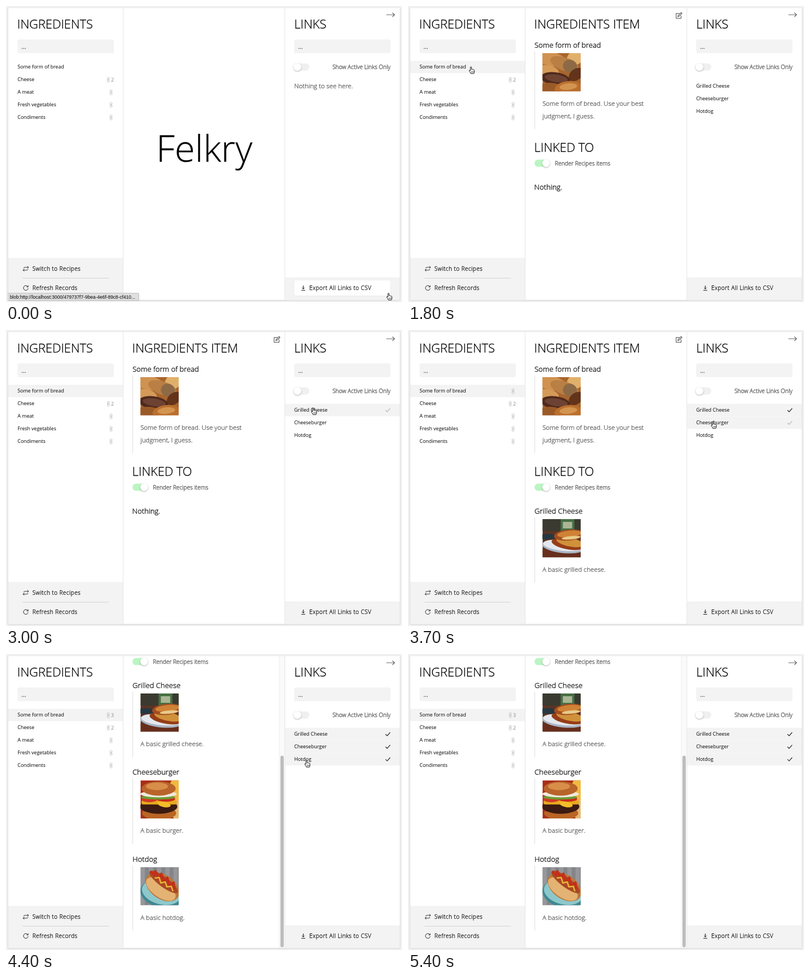
Write an HTML page with a canvas that moves like this. It is 720 px wide and 540 px high and loops after 5500 ms.

```html
<!DOCTYPE html>
<html lang="en">
<head>
<meta charset="utf-8">
<title>Linking records</title>
<style>
html, body { margin: 0; width: 100%; height: 100%; overflow: hidden; background: #f1f1f1; }
canvas { display: block; width: 720px; height: 540px; }
</style>
</head>
<body>
<canvas id="stage"></canvas>
<script>
const LOOP = 5500, STEP = 100;
const OPEN_AT = 1800, LINK_AT = [3300, 3900, 4200];
const PITCH = 158.4, PANEL = '#f3f3f3', LINE = '#e3e3e3';
const BODY = 11.7, LABEL = 10.4, TITLE = 13.4, HEADING = 22.4;

const canvas = document.getElementById('stage');
const ctx = canvas.getContext('2d');
const dpr = window.devicePixelRatio || 1;
canvas.width = 720 * dpr;
canvas.height = 540 * dpr;

const ingredients = ['Some form of bread', 'Cheese', 'A meat', 'Fresh vegetables', 'Condiments'];
const recipes = [
  { name: 'Grilled Cheese', note: 'A basic grilled cheese.', photo: sandwichPhoto },
  { name: 'Cheeseburger', note: 'A basic burger.', photo: burgerPhoto },
  { name: 'Hotdog', note: 'A basic hotdog.', photo: hotdogPhoto }
];

// time, x, y
const path = [
  [0, 697, 530], [100, 692, 526], [300, 575, 478], [600, 341, 386], [900, 226, 245],
  [1100, 201, 205], [1200, 168, 170], [1400, 122, 123], [1500, 116, 117], [1900, 116, 117],
  [2300, 250, 119], [2600, 425, 134], [2900, 560, 148], [3500, 560, 148], [3700, 556, 173],
  [3900, 555, 174], [4100, 548, 200], [4500, 548, 200], [4800, 537, 226], [5300, 425, 550], [5500, 425, 560]
];

function cursorAt(t) {
  const i = Math.max(1, path.findIndex(p => p[0] >= t));
  const [t0, x0, y0] = path[i - 1], [t1, x1, y1] = path[i];
  const k = (t - t0) / (t1 - t0);
  return { x: x0 + (x1 - x0) * k, y: y0 + (y1 - y0) * k };
}

function text(str, x, y, size, { color = '#000', weight = 300, align = 'left', spacing = 0, family = "'Open Sans', sans-serif" } = {}) {
  ctx.font = `${weight} ${size}px ${family}`;
  ctx.letterSpacing = spacing + 'px';
  ctx.textAlign = align;
  ctx.fillStyle = ctx.strokeStyle = color;
  ctx.fillText(str, x, y);
  // a hairline outline gives the light weight its fuller smoothing
  if (weight === 300) {
    ctx.lineWidth = 0.28;
    ctx.lineJoin = 'round';
    ctx.strokeText(str, x, y);
  }
}

function rect(x, y, w, h, color) {
  ctx.fillStyle = color;
  ctx.fillRect(x, y, w, h);
}

function round(x, y, w, h, r, color) {
  ctx.fillStyle = color;
  ctx.beginPath();
  ctx.roundRect(x, y, w, h, r);
  ctx.fill();
}

function stroke(d, color, width = 1) {
  ctx.strokeStyle = color;
  ctx.lineWidth = width;
  ctx.stroke(new Path2D(d));
}

function withShadow(blur, dy, alpha, draw) {
  ctx.save();
  ctx.shadowColor = `rgba(0,0,0,${alpha})`;
  ctx.shadowBlur = blur * dpr;
  ctx.shadowOffsetY = dy * dpr;
  draw();
  ctx.restore();
}

function oval(x, y, rx, ry, turn, color) {
  ctx.fillStyle = color;
  ctx.beginPath();
  ctx.ellipse(x, y, rx, ry, turn, 0, 7);
  ctx.fill();
}

function toggle(x, y, on) {
  round(x, y - 6.5, 27.5, 13, 6.5, on ? '#bbf5c3' : '#f0f0f0');
  withShadow(3, 1, 0.3, () => oval(on ? x + 21 : x + 6, y, 7, 7, 0, '#fff'));
}

function chain(y, count) {
  const x = count > 1 ? 186 : 191;
  ctx.strokeStyle = '#bdbdbd';
  ctx.lineWidth = 0.9;
  for (const top of [-4.2, 0.4]) {
    ctx.beginPath();
    ctx.roundRect(x - 1.9, y + top, 3.8, 4.2, 1.5);
    ctx.stroke();
  }
  stroke(`M${x} ${y - 2}v4.4`, '#bdbdbd', 0.8);
  if (count > 1) text(count, 191, y + 3.2, 9, { color: '#888', weight: 400 });
}

function photo(x, y, base, draw) {
  ctx.save();
  ctx.translate(x, y);
  ctx.beginPath();
  ctx.rect(0, 0, 69.5, 69.5);
  ctx.clip();
  rect(0, 0, 70, 70, base);
  draw();
  ctx.restore();
}

function breadPhoto(x, y) {
  photo(x, y, '#a8652c', () => {
    oval(14, 10, 32, 13, 0.25, '#d09250');
    oval(60, 8, 17, 13, -0.6, '#e0b06a');
    oval(40, 20, 27, 12, 0.35, '#b97f45');
    oval(50, 24, 13, 12, 0.4, '#8d6a45');
    oval(10, 32, 20, 10, 0.2, '#d49a58');
    oval(61, 39, 15, 10, -0.7, '#63331a');
    oval(24, 47, 27, 12, 0.15, '#4f291b');
    oval(25, 46, 21, 7, 0.15, '#6d4233');
    oval(13, 64, 23, 10, 0, '#9a5a28');
    oval(47, 64, 25, 13, -0.1, '#bb6f2e');
    oval(47, 61, 16, 6, -0.1, '#d39450');
  });
}

function sandwichPhoto(x, y) {
  photo(x, y, '#5a3424', () => {
    rect(0, 0, 70, 22, '#3a3a30');
    rect(33, 0, 25, 22, '#477044');
    rect(37, 5, 17, 12, '#a9b695');
    oval(8, 32, 19, 5, 0, '#253842');
    rect(0, 55, 70, 15, '#672e1d');
    oval(38, 50, 39, 12, 0.1, '#aab5c4');
    oval(38, 48, 37, 10, 0.1, '#e4e8ee');
    oval(45, 46, 29, 9, 0.2, '#963d19');
    oval(50, 42, 25, 8, 0.2, '#d0913a');
    oval(48, 29, 27, 10, -0.1, '#a34d1e');
    oval(49, 27, 22, 6, -0.1, '#cf8236');
    oval(52, 34, 17, 3, -0.1, '#e8c987');
  });
}

function burgerPhoto(x, y) {
  photo(x, y, '#a92d17', () => {
    oval(65, 20, 14, 24, 0, '#f0b941');
    oval(67, 54, 12, 18, 0, '#e4b875');
    oval(34, 60, 31, 12, 0, '#b96524');
    oval(33, 48, 34, 13, 0, '#3b1b12');
    round(2, 36, 64, 8, 3, '#e9a91e');
    oval(43, 44, 12, 5, 0.2, '#f5bd29');
    oval(16, 35, 14, 5, 0, '#d13a25');
    oval(46, 34, 17, 5, 0, '#c82c1c');
    oval(32, 31, 31, 4, 0, '#6d9d35');
    oval(33, 25, 33, 6, 0, '#eee9dd');
    oval(33, 15, 31, 13, 0, '#b9642a');
    oval(30, 11, 20, 7, 0, '#d88e49');
  });
}

function hotdogPhoto(x, y) {
  photo(x, y, '#858587', () => {
    for (let i = 0; i < 5; i++) rect(i * 15, 0, 8, 70, '#96979b');
    oval(38, 49, 39, 25, 0.25, '#408891');
    oval(38, 46, 36, 22, 0.25, '#8cc8cb');
    oval(40, 36, 34, 22, 0.6, '#bb783b');
    oval(37, 40, 31, 15, 0.6, '#e4b272');
    oval(42, 27, 32, 9, 0.65, '#a84925');
    ctx.lineJoin = 'round';
    stroke('M18 8l8 7 1-8 7 14 4-9 5 15 6-8 3 15 8-6 2 12', '#c52e18', 4);
    stroke('M26 20l8-1 3 10 8-2 3 9 8-1 3 9', '#edb638', 2.5);
  });
}

function card(title, top, lines, drawPhoto, height) {
  text(title, 230, top, TITLE);
  rect(230, top + 7, 1, height, '#dedede');
  drawPhoto(244.5, top + 10);
  lines.forEach((s, i) => text(s, 244.5, top + 106 + i * 22.5, BODY, { color: '#555' }));
}

function leftPanel(t, links) {
  text('INGREDIENTS', 20.5, 41, HEADING);
  round(21, 61, 175, 25, 3, PANEL);
  text('...', 28, 78, 11.9, { color: '#222' });
  if (t >= OPEN_AT) rect(4, 100, 209, 22.5, PANEL);
  ingredients.forEach((name, i) => {
    const y = 111 + i * 22.9;
    text(name, 21, y + 3.3, 9, { weight: 400 });
    const count = i === 0 ? links : i === 1 ? 2 : 1;
    if (count) chain(y + 0.5, count);
  });
  rect(4, 459.5, 209, 77, PANEL);
  rect(30, 496, 157, 1, '#d4d4d4');
  stroke('M32 478.5q.3-1.7 2-1.7h7m-2.4-2.2l2.6 2.2-2.6 2.2M40 480.2q-.3 1.7-2 1.7h-7m2.4-2.2l-2.6 2.2 2.6 2.2', '#222', 0.9);
  stroke('M39.5 511.8a4.3 4.3 0 1 0 .8 3.2M40.3 509.8v2.8h-2.8', '#222', 1);
  text('Switch to Recipes', 48, 483, LABEL, { spacing: 0.4, color: '#111' });
  text('Refresh Records', 48, 518, LABEL, { spacing: 0.4, color: '#111' });
}

function middlePanel(t, links) {
  if (t < OPEN_AT) {
    text('Felkry', 360.5, 284, 67, { align: 'center' });
    return;
  }
  const scroll = links === 3 ? 273 : links === 2 ? 273 - PITCH : 0;
  ctx.save();
  ctx.beginPath();
  ctx.rect(214, 4, 293, 532);
  ctx.clip();
  ctx.translate(0, -scroll);
  text('INGREDIENTS ITEM', 229.5, 41, HEADING);
  stroke('M493.5 13.5h-6v9h9v-5M490.5 19.5l.6-2.2 5.4-5.4 1.6 1.6-5.4 5.4z', '#555', 1.1);
  card('Some form of bread', 76, ['Some form of bread. Use your best', 'judgment, I guess.'], breadPhoto, 141);
  text('LINKED TO', 229.5, 266, HEADING);
  toggle(230, 286.8, true);
  text('Render Recipes items', 267, 290.5, LABEL, { color: '#444' });
  if (!links) text('Nothing.', 229.5, 335, TITLE);
  recipes.slice(0, links).forEach((r, i) => card(r.name, 335 + i * PITCH, [r.note], r.photo, 119));
  ctx.restore();
  if (scroll) {
    const top = 3 + 533 * scroll / (533 + scroll);
    rect(497, 4, 10, 532, '#fafafa');
    rect(496.5, 4, 1, 532, '#ebebeb');
    round(499, top + 2, 6, 533 - top, 3, '#bdbdbd');
  }
}

function rightPanel(t, links, mouse) {
  text('LINKS', 524, 41, HEADING);
  stroke('M691.5 16h15M702.5 12.3l4 3.7-4 3.7', '#666', 1.2);
  round(524, 61, 175, 25, 3, PANEL);
  text('...', 531, 78, 11.9, { color: '#222' });
  toggle(524, 111.3, false);
  text('Show Active Links Only', 699, 114.8, LABEL, { align: 'right', color: '#444' });
  if (t < OPEN_AT) {
    text('Nothing to see here.', 524, 150, BODY, { color: '#555' });
  } else {
    recipes.forEach((r, i) => {
      const y = 146 + i * 22.9;
      const hover = mouse.x > 507 && Math.abs(mouse.y - 2 - y) < 11.4;
      if (hover || i < links) {
        rect(507.5, y - 11.4, 208.5, 22.9, PANEL);
        stroke(`M690 ${y + 0.3}l3 3 5.5-6.3`, i < links ? '#333' : '#bbb', 1.3);
      }
      text(r.name, 524, y + 3.3, 9, { weight: 400 });
    });
  }
  rect(507.5, 495, 208.5, 41.5, PANEL);
  if (mouse.x > 524 && mouse.y > 500) {
    withShadow(2, 0.5, 0.08, () => round(524, 500.5, 175, 28, 3, '#fff'));
  }
  stroke('M540.5 510v6.2m-2.4-2.4l2.4 2.4 2.4-2.4M537 518.7h7', '#111', 1);
  text('Export All Links to CSV', 551.5, 518, LABEL, { spacing: 0.4, color: '#111' });
}

function statusBar(t) {
  const alpha = Math.min(1, Math.max(0, (750 - t) / 150));
  if (!alpha) return;
  ctx.save();
  ctx.globalAlpha = alpha;
  round(3.5, 523.5, 238.5, 14, [0, 3, 0, 0], '#b9b9b9');
  round(4, 524.5, 237, 12, [0, 2, 0, 0], '#dfdfdf');
  text('blob:http://localhost:3000/479737f7-9bea-4e6f-89c8-cf410...', 7, 533.5, 8.6,
    { weight: 400, family: "'Liberation Sans', sans-serif" });
  ctx.restore();
}

const hand = new Path2D('M-2.6 1V-5a1.1 1.1 0 0 1 2.2 0v3.8q1-.8 1.8.2 1-.6 1.7.4 1.6-.3 1.6 1.2V3q0 1.6-1 3.3h-5.5Q-2.6 4-4.6 1.6q-.6-1.6.8-1.3z');
const arrow = new Path2D('M-4-6V5l2.5-2.3 1.7 3.9 1.8-.8L.3 2.1h3.5z');

function pointer({ x, y }, t) {
  const overRow = (x < 213 && y > 100 && y < 216) || (t >= OPEN_AT && x > 507 && y > 135 && y < 205);
  const isHand = overRow || (x > 524 && y > 500);
  const shape = isHand ? hand : arrow;
  ctx.save();
  ctx.translate(x, y);
  ctx.lineJoin = 'round';
  ctx.lineWidth = 1;
  ctx.fillStyle = isHand ? '#fff' : '#111';
  ctx.strokeStyle = isHand ? '#111' : '#fff';
  ctx.fill(shape);
  ctx.stroke(shape);
  if (isHand) stroke('M-.4 2v2.6M1.3 2v2.6M3 2v2.6', '#111', 0.7);
  ctx.restore();
}

function draw(t) {
  const links = LINK_AT.filter(at => t >= at).length;
  const mouse = cursorAt(t);
  ctx.setTransform(dpr, 0, 0, dpr, 0, 0);
  rect(0, 0, 720, 540, '#f1f1f1');
  withShadow(2, 0.5, 0.25, () => rect(4, 3.5, 712, 533, '#fff'));
  leftPanel(t, links);
  middlePanel(t, links);
  rightPanel(t, links, mouse);
  rect(212.5, 3.5, 1, 533, LINE);
  rect(506.5, 3.5, 1, 533, LINE);
  statusBar(t);
  pointer(mouse, t);
}

const start = performance.now();
function frame() {
  const t = (performance.now() - start) % LOOP;
  draw(Math.floor(t / STEP) * STEP);
  requestAnimationFrame(frame);
}
frame();
</script>
</body>
</html>
```
